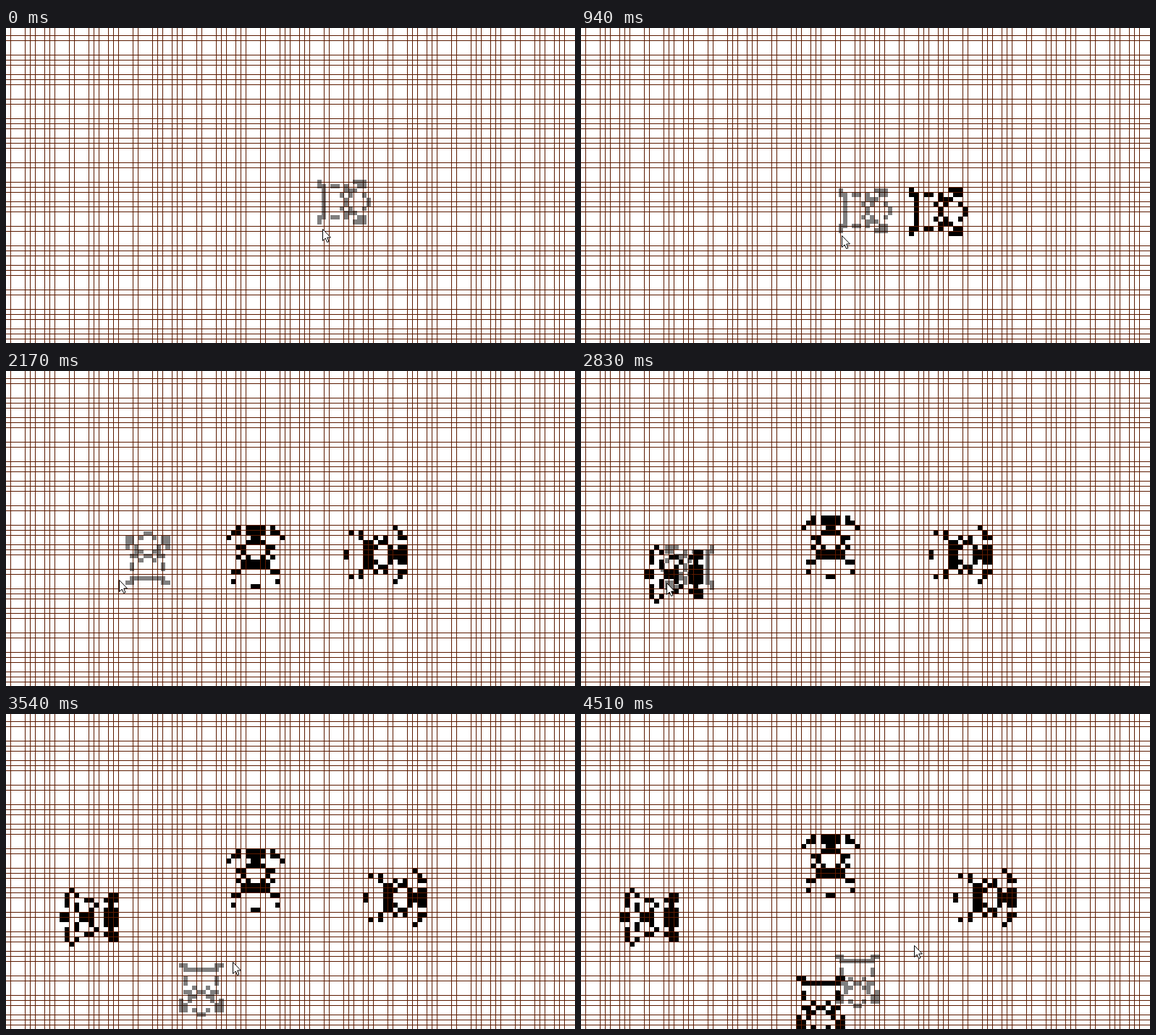
Write an HTML page with a canvas that moves like this. It is 786x436 px and loops after 4580 ms.

```html
<!DOCTYPE html>
<html lang="en">
<head>
<meta charset="utf-8">
<title>Spaceships</title>
<style>
html, body { margin: 0; width: 100%; height: 100%; overflow: hidden; background: #fff; }
canvas { display: block; }
</style>
</head>
<body>
<canvas width="786" height="436"></canvas>
<script>
const W = 786, H = 436, LOOP = 4580;
const FIRST_TICK = 930, TICK = 111, FIRST_SHIP = 810;
const TOP = 11;       // pixel offset of row 0
const GHOST = 6.15;   // cell size of the carried pattern
const PAUSE = 80;     // rest before and after setting a ship down
const ctx = document.querySelector('canvas').getContext('2d');

// Upper half of the ship, travelling left; the lower half mirrors it.
const half = ['.ooo.......o', '.oo..o.oo.oo', '...ooo....o.', '.o..o.o...o.', 'o....o....o.'];
const ship = half.flatMap((line, y) =>
  [...line].flatMap((c, x) => c === 'o' ? [[x, y], [x, 9 - y]] : []));
const turn = {
  left: (x, y) => [x, y],
  right: (x, y) => [11 - x, y],
  up: (x, y) => [y, x],
  down: (x, y) => [y, 11 - x]
};
const facing = dir => ship.map(([x, y]) => turn[dir](x, y));

// Each ship: when its pattern is picked, when it is set down, and where.
const drops = [
  { dir: 'right', picked: 0, time: 480, gen: 0, col: 67, row: 31 },
  { dir: 'up', picked: 1340, time: 1570, gen: 6, col: 46, row: 31 },
  { dir: 'left', picked: 2475, time: 2700, gen: 16, col: 13, row: 35 },
  { dir: 'down', picked: 3250, time: 4150, gen: 29, col: 44, row: 51 }
];

const key = (x, y) => x + ',' + y;
const split = k => k.split(',').map(Number);

function nextGeneration(live) {
  const near = new Map();
  for (const k of live) {
    const [x, y] = split(k);
    for (let dx = -1; dx < 2; dx++)
      for (let dy = -1; dy < 2; dy++)
        if (dx || dy) {
          const n = key(x + dx, y + dy);
          near.set(n, (near.get(n) || 0) + 1);
        }
  }
  const next = new Set();
  for (const [k, n] of near) if (n === 3 || (n === 2 && live.has(k))) next.add(k);
  return next;
}

const generations = [];
let live = new Set();
for (let n = 0; n <= (LOOP - FIRST_TICK) / TICK; n++) {
  live = nextGeneration(live);
  for (const { gen, col, row, dir } of drops)
    if (gen === n) for (const [x, y] of facing(dir)) live.add(key(col + x, row + y));
  generations.push([...live].map(split));
}

// The board is 10 units per cell, sampled at 65/44 units per pixel.
const edge = k => Math.ceil((440 * k - 35) / 65);
const isLine = p => (Math.floor((65 * p + 35) / 44) + 20) % 10 === 9;

const hold = (from, to, x, y) => [[from, x, y], [to, x, y]];

// Time, x and y of the carried pattern: its turning points and a rest at each drop.
const ghostPath = [
  ...hold(0, 260, 430, 210),
  ...hold(740, 1010, 356, 222),
  [1730, 313, 216],
  [2170, 165, 222],
  [2830, 110, 241],
  [3540, 239, 345],
  ...hold(4510, LOOP, 351, 333),
  ...drops.flatMap(d => hold(d.time - PAUSE, d.time + PAUSE, edge(d.col), TOP + edge(d.row)))
].sort((a, b) => a[0] - b[0]);

// Pointer position relative to the carried pattern.
const grip = [
  ...hold(0, 260, 7, 68),
  ...hold(740, 1010, 4, 65),
  [1730, -3, 67],
  [2170, -9, 67],
  [2830, 8, 52],
  [3540, 74, -2],
  ...hold(4510, LOOP, 109, -13)
];

const easeOut = u => 1 - (1 - u) ** 2;

function follow(path, t) {
  const i = path.findIndex(p => p[0] > t);
  const [t0, x0, y0] = path[i - 1], [t1, x1, y1] = path[i];
  const u = easeOut((t - t0) / (t1 - t0));
  return [Math.round(x0 + (x1 - x0) * u), Math.round(y0 + (y1 - y0) * u)];
}

function drawBoard(t) {
  ctx.fillStyle = '#000';
  if (t >= FIRST_SHIP) {
    const n = Math.max(0, Math.floor((t - FIRST_TICK) / TICK));
    for (const [c, r] of generations[n]) {
      const x = edge(c), y = edge(r);
      ctx.fillRect(x, TOP + y, edge(c + 1) - x, edge(r + 1) - y);
    }
  }
  ctx.fillStyle = '#5c1a00';
  for (let x = 0; x < W; x++) if (isLine(x)) ctx.fillRect(x, 0, 1, H);
  for (let y = 0; y < H; y++) if (isLine(y - TOP)) ctx.fillRect(0, y, W, 1);
}

function drawGhost(left, top, dir) {
  const at = k => Math.round(k * GHOST);
  ctx.fillStyle = 'rgba(0,0,0,.5)';
  for (const [x, y] of facing(dir))
    ctx.fillRect(left + at(x), top + at(y), at(x + 1) - at(x), at(y + 1) - at(y));
}

const arrow = new Path2D('M.5.5V16.5L4.2 13L6.6 18.5L9 17.5L6.7 12H11.5Z');
function drawPointer(x, y) {
  ctx.save();
  ctx.translate(x, y);
  ctx.fillStyle = '#fff';
  ctx.strokeStyle = '#000';
  ctx.fill(arrow);
  ctx.stroke(arrow);
  ctx.restore();
}

function draw() {
  const t = performance.now() % LOOP;
  ctx.fillStyle = '#fff';
  ctx.fillRect(0, 0, W, H);
  drawBoard(t);
  const [x, y] = follow(ghostPath, t), [dx, dy] = follow(grip, t);
  drawGhost(x, y, drops.filter(d => d.picked <= t).pop().dir);
  drawPointer(x + dx, y + dy);
  requestAnimationFrame(draw);
}
draw();
</script>
</body>
</html>
```
